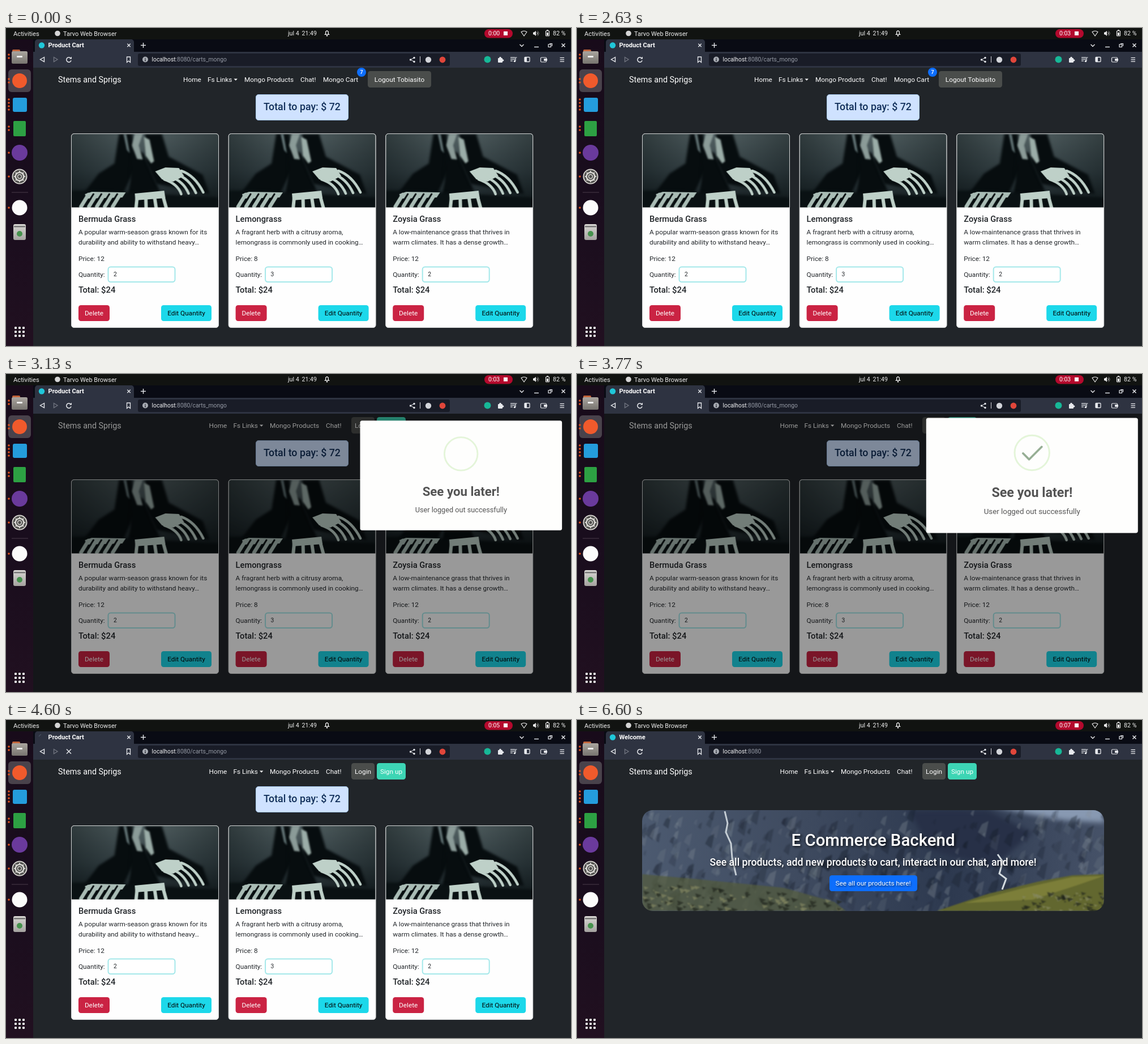
Recreate the animation shown at these times as an HTML page with a canvas. Size 998 px wide and 561 px high, loop 7.13 s.

```html
<!DOCTYPE html>
<html lang="en">
<head>
<meta charset="utf-8">
<title>Product Cart</title>
<style>
html, body { margin: 0; width: 100%; height: 100%; overflow: hidden; background: #212529; }
canvas { display: block; }
</style>
</head>
<body>
<canvas id="stage" width="998" height="561"></canvas>
<script>
const W = 998, H = 561, LOOP = 7130;
const POPUP_AT = 2916, POPUP_SHOWN = 2970, POPUP_END = 4310;
const LOAD_AT = 4480, PAGE_AT = 4900, HERO_AT = 5400;
const TICKS = [600, 1600, 2600, 3800, 4600, 5600, 6600];
const FONT = 'Roboto, "Noto Sans", sans-serif';
let g = document.getElementById('stage').getContext('2d');

// ---- helpers ----
const clamp = v => Math.max(0, Math.min(1, v));
const lerp = (a, b, p) => a + (b - a) * p;

// CSS "ease" timing: cubic-bezier(.25, .1, .25, 1)
function ease(x) {
  if (x <= 0 || x >= 1) return clamp(x);
  const bez = (u, a, b) => 3 * (1 - u) ** 2 * u * a + 3 * (1 - u) * u * u * b + u ** 3;
  let lo = 0, hi = 1;
  for (let i = 0; i < 20; i++) {
    const mid = (lo + hi) / 2;
    if (bez(mid, .25, .25) < x) lo = mid; else hi = mid;
  }
  return bez(lo, .1, 1);
}

// keys: [offset, ...values]
function keyframes(p, keys) {
  p = clamp(p);
  let i = 1;
  while (i < keys.length - 1 && p > keys[i][0]) i++;
  const [a, b] = [keys[i - 1], keys[i]];
  const e = ease((p - a[0]) / (b[0] - a[0]));
  return a.slice(1).map((v, k) => lerp(v, b[k + 1], e));
}

function rect(x, y, w, h, fill) { g.fillStyle = fill; g.fillRect(x, y, w, h); }

function box(x, y, w, h, r, fill, stroke, line = 1) {
  g.beginPath();
  g.roundRect(x, y, w, h, r);
  if (fill) { g.fillStyle = fill; g.fill(); }
  if (stroke) { g.strokeStyle = stroke; g.lineWidth = line; g.stroke(); }
}

function dot(x, y, r, fill) {
  g.beginPath();
  g.arc(x, y, r, 0, 7);
  g.fillStyle = fill;
  g.fill();
}

function ring(x, y, r, color, line, from = 0, to = Math.PI * 2) {
  g.beginPath();
  g.arc(x, y, r, from, to);
  g.strokeStyle = color;
  g.lineWidth = line;
  g.stroke();
}

function trace(pts) {
  g.beginPath();
  for (let i = 0; i < pts.length; i += 2) g.lineTo(pts[i], pts[i + 1]);
}
function poly(fill, ...pts) { trace(pts); g.fillStyle = fill; g.fill(); }
function line(color, width, ...pts) {
  trace(pts);
  g.strokeStyle = color;
  g.lineWidth = width;
  g.stroke();
}

function text(s, x, y, size, color = '#fff', weight = 400, align = 'left') {
  g.font = `${weight} ${size}px ${FONT}`;
  g.fillStyle = color;
  g.textAlign = align;
  g.fillText(s, x, y);
}

function button(s, x, y, w, h, fill, color) {
  box(x, y, w, h, 4.4, fill);
  text(s, x + w / 2, y + h / 2 + 4.2, 11.8, color, 400, 'center');
}

function offscreen(w, h, draw) {
  const c = document.createElement('canvas'), main = g;
  c.width = w;
  c.height = h;
  g = c.getContext('2d');
  draw(w, h);
  g = main;
  return c;
}

function fade(x0, y0, x1, y1, ...colors) {
  const f = g.createLinearGradient(x0, y0, x1, y1);
  colors.forEach((c, i) => f.addColorStop(i / (colors.length - 1), c));
  return f;
}

// ---- pictures ----
const forks = offscreen(260, 130, (w, h) => {
  rect(0, 0, w, h, fade(0, 0, 0, h, '#536163', '#39464a', '#141c1f'));
  rect(0, 0, w, h, fade(0, 0, w, 0, 'rgba(5,12,14,.45)', 'rgba(5,12,14,0)', 'rgba(5,12,14,.4)'));
  g.filter = 'blur(2px)';
  const dark = '#070d0f', light = '#bed0c8';
  poly(dark, 84, 0, 108, 0, 112, 62, 92, 104, 10, 130, 22, 104, 48, 70, 76, 52);
  poly(dark, 106, 24, 128, 34, 168, 130, 96, 130, 104, 84);
  poly(dark, 130, 0, 160, 0, 172, 40, 232, 72, 244, 106, 150, 88, 132, 50);
  poly('#0a1113', 0, 100, 40, 100, 260, 112, 260, 130, 0, 130);
  g.filter = 'blur(1.5px)';
  poly('#8b9b98', 112, 0, 126, 0, 119, 20, 126, 45, 116, 44, 107, 20);
  poly('#9bada8', 128, 5, 138, 10, 146, 48, 141, 52, 131, 38);
  poly('#66787a', 92, 0, 97, 0, 103, 34, 98, 28);
  g.filter = 'blur(.7px)';
  g.lineCap = 'round';
  poly(light, 148, 66, 166, 59, 190, 60, 199, 74, 180, 84, 160, 80);
  for (let i = 0; i < 4; i++) {
    const x = 164 + i * 10, y = 80 - i * 5;
    g.beginPath();
    g.moveTo(x, y);
    g.quadraticCurveTo(x + 24, y + 8, x + 30 + i * 3, 106 - i);
    g.strokeStyle = light;
    g.lineWidth = 4.5;
    g.stroke();
  }
  poly(light, 112, 105, 164, 100, 166, 113, 113, 117);
  for (let i = 0; i < 4; i++) line(light, 6, 116 + i * 15.5, 112, 114 + i * 18, 132);
  for (let i = 0; i < 5; i++) line('#a9bcb5', 6.5, 30 + i * 14, 107, 17 + i * 14, 128);
  poly('#a9bcb5', 24, 106, 36, 102, 96, 103, 90, 112, 26, 114);
  for (let i = 0; i < 4; i++) line(dark, 3, 39 + i * 14, 106, 30 + i * 14, 120);
});

const mountains = offscreen(816, 178, (w, h) => {
  let seed = 17;
  const rnd = () => (seed = seed * 16807 % 2147483647) / 2147483647;
  rect(0, 0, w, h, fade(0, 0, w, 0, '#4c5a70', '#3f4b60', '#2d394f', '#465268'));
  g.filter = 'blur(5px)';
  poly('#8899b2', 610, -8, 816, -8, 816, 22, 745, 18, 690, 8);
  poly('#273047', 470, 0, 610, 0, 690, 40, 620, 100, 510, 70);
  g.filter = 'blur(1px)';
  for (let i = 0; i < 420; i++) {
    const x = rnd() * w, y = rnd() * h, s = 5 + rnd() * 20;
    const tone = rnd() < .58 ? 'rgba(20,27,39,' : 'rgba(132,143,151,';
    poly(`${tone}${.12 + rnd() * .25})`, x, y, x + s * .5, y - s * .25, x + s * .25, y + s, x - s * .3, y + s * .6);
  }
  poly('rgba(83,91,62,.75)', 0, 113, 100, 122, 250, 137, 340, 162, 360, 178, 0, 178);
  poly('#62672f', 520, 178, 610, 148, 700, 126, 760, 115, 816, 113, 816, 178);
  poly('#7c7e39', 570, 164, 680, 136, 760, 118, 816, 116, 770, 132, 690, 158);
  for (let i = 0; i < 230; i++) {
    const right = rnd() < .35;
    const x = right ? 670 + rnd() * 146 : rnd() * 350;
    const y = right ? 144 + rnd() * 34 : 125 + x * .08 + rnd() * 46;
    const s = 2 + rnd() * 7;
    poly(rnd() < .55 ? 'rgba(30,36,28,.65)' : 'rgba(133,136,98,.65)', x, y, x + s * 1.5, y + s * .4, x + s * .4, y + s);
  }
  g.filter = 'blur(.5px)';
  line('#c5cdd4', 3, 146, 2, 151, 23, 148, 39, 157, 59, 159, 84, 166, 115);
  line('#d5dce0', 3, 628, 78, 637, 91, 631, 112, 643, 121, 636, 140);
});

// ---- desktop and browser ----
function desktopBar(t) {
  rect(0, 0, W, 20, '#111311');
  text('Activities', 13, 13.5, 11.2, '#eee');
  dot(91, 9.5, 4.8, '#d5d5d5');
  text('Tarvo Web Browser', 101, 13.5, 11, '#eee');
  text('jul 4', 498, 13.2, 10.8, '#eee');
  text('21:49', 522.5, 13.2, 10.6, '#eee');
  poly('#eee', 562, 12, 564, 10, 564, 6, 567, 4, 570, 6, 570, 10, 572, 12);
  box(565.3, 6, 3.4, 5, 1, '#111311');
  dot(567, 13.5, 1.3, '#eee');
  box(845, 2, 50, 15.5, 7.7, '#b4092d');
  text('0:0' + TICKS.filter(v => t >= v).length, 852, 13.3, 10.5);
  rect(879, 6, 7, 7, '#fff');
  g.beginPath();
  g.moveTo(915, 14);
  g.lineTo(910, 7);
  g.quadraticCurveTo(915, 3.5, 920, 7);
  g.closePath();
  g.strokeStyle = '#eee';
  g.lineWidth = 1.1;
  g.stroke();
  poly('#eee', 931, 7.5, 933, 7.5, 936, 5, 936, 14, 933, 11.5, 931, 11.5);
  ring(936, 9.5, 2.8, '#eee', 1, -1, 1);
  ring(936, 9.5, 5, '#999', 1, -1, 1);
  box(953.5, 5, 6, 9, 1, null, '#eee', 1.2);
  rect(955, 3.3, 3, 1.5, '#eee');
  rect(955, 8, 3, 5, '#eee');
  text('82 %', 966, 13.3, 10.7, '#eee');
}

function dock() {
  rect(0, 20, 48, H - 20, fade(0, 20, 48, H, '#180b1a', '#190d1d', '#211020'));
  box(4, 73, 40, 40, 6, '#49424b');
  box(11, 38, 14, 12, 2, '#c3653b');
  box(10, 41, 28, 22, 2.5, fade(0, 41, 0, 63, '#aaa59f', '#77746f'));
  box(19, 49, 10, 3, 1, '#eee');
  dot(24, 93, 13, '#f05a2c');
  box(12, 123, 25, 25, 3, '#249cdc');
  box(13, 164, 22, 27, 2, '#2da043');
  dot(24, 220, 14, '#6a3a9c');
  dot(24, 262, 13.5, '#d2d0cb');
  dot(24, 262, 11.5, '#4d4d4b');
  ring(24, 262, 7.3, '#d8d6d2', 2.5);
  ring(24, 262, 3.4, '#d8d6d2', 1.5);
  for (let a = 0; a < 8; a++) {
    const c = Math.cos(a * Math.PI / 4), s = Math.sin(a * Math.PI / 4);
    line('#d8d6d2', 2, 24 + c * 8, 262 + s * 8, 24 + c * 10, 262 + s * 10);
  }
  rect(10, 289.5, 29, 1, '#4a3d4a');
  dot(24, 317, 13.5, '#fbfbfb');
  box(13, 346, 22, 28, 3, fade(0, 346, 0, 374, '#dad9d5', '#a4a29f'));
  rect(14, 349, 20, 2.5, '#777');
  dot(24, 363, 5, '#46924d');
  const running = [[50, 2], [93, 2], [135, 4], [177, 2], [220, 1], [262, 1], [317, 1]];
  for (const [y, n] of running)
    for (let i = 0; i < n; i++) dot(5, y + (i - (n - 1) / 2) * 6, 1.8, '#e2531f');
  for (let i = 0; i < 9; i++) box(15 + i % 3 * 7, 527 + (i / 3 | 0) * 7, 4, 4, 1.2, '#f4f4f4');
}

function cross(x, y, r, color, width = 1.3) {
  line(color, width, x - r, y - r, x + r, y + r);
  line(color, width, x + r, y - r, x - r, y + r);
}

function favicon(t) {
  const loading = t >= LOAD_AT && t < PAGE_AT;
  if (loading) {
    const a = 3.4 + (t - 4600) / 160;
    ring(63, 30.5, 5, '#566070', 1, a, a + 1.1);
  } else {
    dot(63, 30.5, t < PAGE_AT ? 5.2 : lerp(3, 5.2, ease((t - 5450) / 200)), '#20c7d9');
  }
  return loading;
}

function browser(t) {
  const welcome = t >= PAGE_AT, ink = '#e7e9ed';
  rect(48, 20, W - 48, 22, '#090b14');
  box(51, 20, 175, 24, [5, 5, 0, 0], '#2e3341');
  rect(48, 42, W - 48, 28, '#2e3341');
  const loading = favicon(t);
  text(welcome ? 'Welcome' : 'Product Cart', 74.5, 34.3, 11.1, '#fff', 700);
  cross(217, 30.5, 2.7, ink);
  line(ink, 1.4, 238, 30.5, 247, 30.5);
  line(ink, 1.4, 242.5, 26, 242.5, 35);
  line(ink, 1.4, 907.5, 29, 911, 32.5, 914.5, 29);
  line(ink, 1.4, 933, 33.5, 941, 33.5);
  g.strokeStyle = ink;
  g.lineWidth = 1.2;
  g.strokeRect(958, 29, 4.5, 4.5);
  line(ink, 1.2, 960, 27.5, 964.5, 27.5, 964.5, 32);
  cross(984.5, 30.5, 3, ink, 1.4);

  trace([67.5, 51.5, 60.5, 55.5, 67.5, 59.5]);
  g.closePath();
  g.stroke();
  trace([84.5, 51.5, 91, 55.5, 84.5, 59.5]);
  g.closePath();
  g.strokeStyle = '#70747f';
  g.stroke();
  if (loading) {
    cross(111, 55.5, 4, ink, 1.5);
  } else {
    ring(111, 56, 4.2, ink, 1.5, .3, 5.4);
    poly(ink, 112, 54.5, 116, 54.5, 116, 50.5);
  }
  trace([213.5, 51, 219.5, 51, 219.5, 60.5, 216.5, 58, 213.5, 60.5]);
  g.closePath();
  g.strokeStyle = ink;
  g.lineWidth = 1.3;
  g.stroke();

  box(233, 45, 551, 22, 3, '#191c27');
  dot(246, 55.5, 5, '#a7abb2');
  rect(245.3, 53, 1.4, 1.4, '#191c27');
  rect(245.3, 55.3, 1.4, 3.3, '#191c27');
  text('localhost', 257.5, 59.2, 10.3, '#f0f1f3');
  const x = 257.5 + g.measureText('localhost').width;
  text(welcome ? ':8080' : ':8080/carts_mongo', x, 59.2, 10.3, '#959aa5');
  line(ink, 1, 721, 52.5, 714.5, 56, 721, 59.5);
  for (const [px, py] of [[721, 52.5], [714.5, 56], [721, 59.5]]) dot(px, py, 1.7, ink);
  rect(731, 50, 1, 11, '#d5d7dc');
  dot(746, 56, 5.2, '#d2d4d9');
  dot(771, 56, 5.4, '#e0463a');
  dot(850.5, 55.5, 6, '#17b897');
  box(869, 53, 8, 8, 1, ink);
  dot(873, 52.5, 1.8, ink);
  dot(877.6, 57, 1.8, ink);
  for (let i = 0; i < 3; i++) {
    line(ink, 1.3, 891, 52 + i * 3, i < 2 ? 899 : 895, 52 + i * 3);
    line(ink, 1.3, 978.5, 52.5 + i * 3.3, 986, 52.5 + i * 3.3);
  }
  line(ink, 1.2, 902.5, 52, 900, 52, 900, 58);
  dot(898.5, 58.5, 1.8, ink);
  box(916, 51.5, 9, 8, 1, null, ink, 1.3);
  rect(916, 52, 4, 7, ink);
  box(944.5, 52, 10, 8, 1.5, null, ink, 1.2);
  box(950, 54, 6, 4, 1, ink);
}

// ---- page ----
function navbar(loggedIn) {
  const xs = loggedIn ? [313, 356, 421, 520] : [358.5, 401.5, 466, 565];
  text('Stems and Sprigs', 92, 95.7, 14.3);
  ['Home', 'Fs Links', 'Mongo Products', 'Chat!'].forEach((s, i) => text(s, xs[i], 95, 11.8));
  const c = xs[1] + 46.5;
  poly('#fff', c, 89.5, c + 6.4, 89.5, c + 3.2, 92.7);
  if (loggedIn) {
    text('Mongo Cart', 560, 95, 11.8);
    dot(628, 78, 8, '#0d6efd');
    text('7', 628, 81.2, 8.9, '#fff', 700, 'center');
    button('Logout Tobiasito', 639, 76, 112, 29, '#4a4d4b', '#fff');
  } else {
    button('Login', 610, 76, 41, 29, '#4a4d4b', '#fff');
    button('Sign up', 655, 76, 51, 29, '#3dd5b4', '#fff');
  }
}

const PRODUCTS = [
  ['Bermuda Grass', 'A popular warm-season grass known for its', 'durability and ability to withstand heavy…', 12, 2],
  ['Lemongrass', 'A fragrant herb with a citrusy aroma,', 'lemongrass is commonly used in cooking…', 8, 3],
  ['Zoysia Grass', 'A low-maintenance grass that thrives in', 'warm climates. It has a dense growth…', 12, 2]
];

function card([name, line1, line2, price, count], i) {
  const ink = '#212529';
  g.save();
  g.translate(115.5 + i * 277.6, 0);
  box(0, 186.5, 260, 342, 4.5, '#fefefe');
  g.save();
  g.beginPath();
  g.roundRect(.5, 187, 259, 129.5, [4, 4, 0, 0]);
  g.clip();
  g.drawImage(forks, 0, 187);
  g.restore();
  box(0, 186.5, 260, 342, 4.5, null, '#d3d6d6');
  text(name, 12.5, 342, 14.7, ink, 500);
  text(line1, 12.5, 364.3, 11.8, ink);
  text(line2, 12.5, 382, 11.8, ink);
  text('Price: ' + price, 12.5, 411, 11.8, ink);
  text('Quantity:', 12.5, 438.5, 11.8, ink);
  box(65, 421.5, 118, 26.5, 4.4, '#fff', '#a4e8ea', 2);
  text(count, 74.5, 438, 10.3, ink);
  text('Total: $' + price * count, 12.5, 467.3, 14.75, ink, 500);
  button('Delete', 12.5, 489, 55, 28, '#ca2343', '#fff');
  button('Edit Quantity', 158.5, 489, 89, 28, '#1cd8ea', '#000');
  g.restore();
}

function cartPage() {
  box(441.5, 117.5, 163, 45, 4.4, '#cfe2ff', '#a9caf5');
  text('Total to pay: $ 72', 523, 145.2, 17.8, '#12305a', 500, 'center');
  PRODUCTS.forEach(card);
}

function welcomePage(t) {
  if (t >= HERO_AT) {
    g.save();
    g.beginPath();
    g.roundRect(115, 159, 816, 178, 19);
    g.clip();
    g.drawImage(mountains, 115, 159);
    g.restore();
  }
  g.save();
  g.shadowColor = 'rgba(0,0,0,.75)';
  g.shadowBlur = 4;
  g.shadowOffsetX = g.shadowOffsetY = 2;
  text('E Commerce Backend', 523, 222, 29.4, '#fff', 500, 'center');
  text('See all products, add new products to cart, interact in our chat, and more!', 523, 257, 17.7, '#fff', 500, 'center');
  g.restore();
  box(446, 274, 155, 28, 4.4, '#0d6efd');
  g.save();
  g.shadowColor = 'rgba(0,0,0,.6)';
  g.shadowBlur = 3;
  g.shadowOffsetX = g.shadowOffsetY = 1.5;
  text('See all our products here!', 523, 292, 11.8, '#fff', 400, 'center');
  g.restore();
}

// ---- popup ----
const TIP = [[0, 1.1875, .0625, 0], [.54, 1.0625, .125, 0], [.7, 2.1875, -.375, 3.125],
  [.84, 3, 1.3125, 1.0625], [1, 2.875, .8125, 1.5625]];
const LONG = [[0, 3.375, 2.875, 0], [.65, 3.375, 2.875, 0], [.84, 2.1875, 0, 3.4375], [1, 2.375, .5, 2.9375]];

function bar(cx, cy, len, angle, color) {
  if (len < .01) return;
  g.save();
  g.translate(cx, cy);
  g.rotate(angle);
  box(-len / 2, -.156, len, .3125, .125, color);
  g.restore();
}

function successIcon(t) {
  const em = 11.7, p = (t - POPUP_AT) / 750, tone = clamp((t - 3770) / 200);
  const color = `rgb(${lerp(150, 165, tone)},${lerp(174, 220, tone)},${lerp(148, 134, tone)})`;
  ring(803.7, 139, 2.625 * em, 'rgba(165,220,134,.3)', em / 4);
  g.save();
  g.translate(803.7 - 2.5 * em, 139 - 2.5 * em);
  g.scale(em, em);
  const [y1, left, w1] = keyframes(p, TIP);
  const [y2, right, w2] = keyframes(p, LONG);
  bar(left + w1 / 2, y1 + .156, w1, Math.PI / 4, color);
  bar(5 - right - w2 / 2, y2 + .156, w2, -Math.PI / 4, color);
  g.restore();
}

function popup(t) {
  if (t < POPUP_SHOWN || t >= POPUP_END + 150) return;
  const out = t - POPUP_END;
  const shade = out < 0 ? ease((t - POPUP_AT) / 100) : 1 - ease(out / 100);
  rect(48, 70, W - 48, H - 70, `rgba(0,0,0,${.4 * shade})`);
  const hide = ease(out / 150);
  const scale = out < 0
    ? keyframes((t - POPUP_AT) / 300, [[0, .7], [.45, 1.05], [.8, .95], [1, 1]])[0]
    : 1 - hide / 2;
  g.save();
  g.globalAlpha = 1 - hide;
  g.translate(803.8, 179);
  g.scale(scale, scale);
  g.translate(-803.8, -179);
  box(616.8, 77.5, 374, 203, 3.7, '#fefefd');
  successIcon(t);
  text('See you later!', 803.8, 217, 23.3, '#545454', 700, 'center');
  text('User logged out successfully', 803.8, 247.3, 13.3, '#545454', 400, 'center');
  g.restore();
}

function draw(t) {
  rect(0, 0, W, H, '#212529');
  navbar(t < POPUP_SHOWN);
  if (t < PAGE_AT) cartPage(); else welcomePage(t);
  popup(t);
  browser(t);
  dock();
  desktopBar(t);
}

const start = performance.now();
function frame() {
  draw((performance.now() - start) % LOOP);
  requestAnimationFrame(frame);
}
frame();
</script>
</body>
</html>
```
